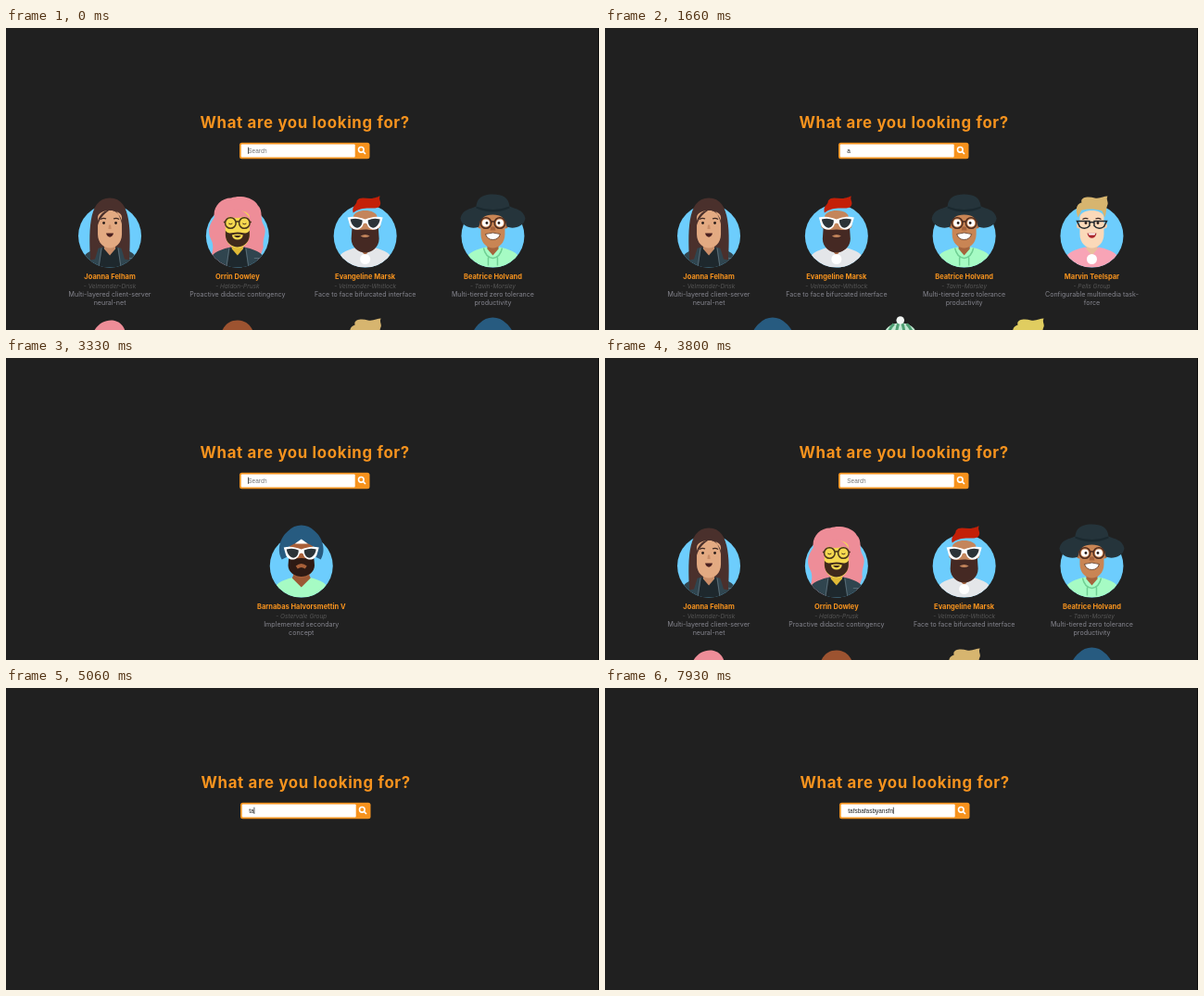
Animation of 640 by 326 pixels, one loop 8 s. Source, as an HTML page:

```html
<!DOCTYPE html>
<html lang="en">
<head>
<meta charset="utf-8">
<title>People search</title>
<style>
  html, body { margin: 0; width: 100%; height: 100%; overflow: hidden; background: #202020; }
  svg { display: block; width: 100vw; height: 100vh; }
  text { font-family: Inter, sans-serif; }
  .title { font-size: 16.8px; font-weight: 700; letter-spacing: .04em; fill: #f7931e; text-anchor: middle; }
  .field { font-family: "Liberation Sans", Arial, sans-serif; font-size: 6.45px; fill: #222; }
  .hint { fill: #757575; }
  .card text { text-anchor: middle; }
  .name { font-size: 7.5px; font-weight: 700; fill: #f7931e; }
  .firm { font-size: 6.5px; font-style: italic; fill: #565656; }
  .about { font-size: 7.1px; fill: #85858e; }
</style>
</head>
<body>
<svg viewBox="0 0 640 326" preserveAspectRatio="none">
  <defs>
    <clipPath id="bust"><path d="M-40-60H40V0H34A34 34 0 0 1-34 0H-40Z"/></clipPath>
    <path id="torso" d="M-34 36C-31 18-20 15-7 12L0 18L7 12C20 15 31 18 34 36Z"/>
    <path id="neck" d="M-6 4H6V14L0 21L-6 14Z"/>
    <path id="face" d="M-13-20C-13-30 13-30 13-20V-2C13 8 6 13 0 13S-13 8-13-2Z"/>
    <g id="ears"><circle cx="-13.5" cy="-11" r="3"/><circle cx="13.5" cy="-11" r="3"/></g>
    <g id="eyes" fill="#2a1d1a"><circle cx="-6.5" cy="-14" r="1.4"/><circle cx="6.5" cy="-14" r="1.4"/></g>
    <path id="brows" fill="none" stroke="#3f2a24" stroke-width="1.2" d="M-10-18q3-2 6-.5M4-18.5q3-1.500 6 .5"/>
    <g id="rounds" fill="none" stroke-width="1.5">
      <circle cx="-7.5" cy="-14" r="5.8"/><circle cx="7.5" cy="-14" r="5.8"/>
      <path d="M-2-15q2-1.500 4 0M-13-15h-2M13-15h2"/>
    </g>
    <g id="shades">
      <path fill="#fff" d="M-19-20C-12-22-5-20 0-18C5-20 12-22 19-20L17-13C15-5 4-5 2-13L0-14L-2-13C-4-5-15-5-17-13Z"/>
      <path id="lens" fill="#2b3338" d="M-16-18Q-9-20-3-17C-3-6-14-6-16-18Z"/>
      <use href="#lens" transform="scale(-1 1)"/>
    </g>
    <path id="beard" d="M-14-12C-11-4-6-7 0-7S11-4 14-12L15 3C15 12 7 18 0 18S-15 12-15 3Z"/>
    <path id="quiff" d="M-15-20C-19-31-15-35-11-36C-13-42-4-43 3-41C9-40 13-43 17-43C15-39 18-37 17-34C15-30 16-25 14-20L11-27C2-30-5-29-11-28Z"/>
    <g id="jacket">
      <use href="#torso" fill="#30454f"/>
      <path fill="#1e282d" d="M-8 12L-12 36H12L8 12L0 20Z"/>
      <path stroke="#6b7d87" stroke-width=".7" fill="none" d="M-9 13L-12 34M9 13L12 34M18 24h6"/>
    </g>

    <g id="a0">
      <path fill="#4a302c" d="M-21 28C-22 0-25-41 0-41S22 0 21 28Z"/>
      <use href="#jacket"/>
      <path fill="#4a302c" d="M-21-10H-12L-12 12L-16 25L-21 26ZM21-10H12L12 12L16 25L21 26Z"/>
      <use href="#neck" fill="#c98d68"/><use href="#face" fill="#e3aa82"/>
      <path fill="#4a302c" d="M-14-6C-16-35 16-35 14-6C13-18 9-26 3-31C-3-25-12-22-14-6Z"/>
      <use href="#brows"/><use href="#eyes"/>
      <path fill="#c98d68" d="M-1-12L-1.600-7.500H1.600L1-12Z"/>
      <path fill="#4a2020" d="M-4-3H4C3 2.500-3 2.500-4-3Z"/>
    </g>

    <g id="a1">
      <path fill="#ee8d98" d="M-25 34C-33 24-23 16-28 5C-34-6-29-14-25-20C-27-31-18-41-7-41C4-45 18-41 22-33C28-27 24-19 28-12C33-3 26 2 28 12L23 26Z"/>
      <use href="#jacket"/>
      <use href="#neck" fill="#dfb936"/><use href="#face" fill="#f5d84f"/>
      <path fill="#40291c" d="M-13-6C-10-1-6-4 0-4S10-1 13-6V-1C13 7 6 12 0 12S-13 7-13-1Z"/>
      <path fill="#f5d84f" d="M-6-1Q0-3 6-1Q5 4 0 4T-6-1Z"/>
      <path fill="#40291c" d="M-4-.5H4Q0 4-4-.5Z"/>
      <path fill="#ee8d98" d="M-16-6C-20-36 16-36 16-6L13-14C12-18 10-20 7-21Q-1-18-9-21C-12-19-13-14-13-11Z"/>
      <path fill="none" stroke="#40291c" d="M-9.500-13.500q2 1.500 4 0M5.500-13.500q2 1.500 4 0"/>
      <use href="#rounds" stroke="#4b371c"/>
    </g>

    <g id="a2">
      <use href="#torso" fill="#e4e6e9"/>
      <use href="#neck" fill="#a9653f"/><use href="#ears" fill="#b87950"/><use href="#face" fill="#c4855b"/>
      <path fill="#c32008" d="M-13-25C-15-33-9-33-9-38C-5-44 3-39 9-41C14-42 15-43 16-43C14-39 18-37 16-33C14-29 8-30 4-30C-2-30-8-29-13-25Z"/>
      <use href="#beard" fill="#452923"/>
      <path fill="#c4855b" d="M-5 0Q0-3 5 0Q0 3-5 0Z"/>
      <use href="#shades"/>
      <circle cy="25" r="5.5" fill="#fff"/>
    </g>

    <g id="a3">
      <use href="#torso" fill="#a6fbc4"/>
      <use href="#neck" fill="#a5633c"/><use href="#ears" fill="#b87549"/><use href="#face" fill="#c98554"/>
      <path fill="#25343b" d="M-35-19C-33-29-24-29-18-32C-17-42-10-45 0-45S17-42 18-32C24-29 33-29 35-19C34-10 22-7 15-10C13-20 9-23 0-23S-13-20-15-10C-22-7-34-10-35-19Z"/>
      <path fill="#1b292f" d="M-18-32Q0-25 18-32V-30Q0-22-18-30Z"/>
      <g fill="#fff"><circle cx="-7.5" cy="-14" r="4"/><circle cx="7.5" cy="-14" r="4"/></g>
      <use href="#eyes"/><use href="#rounds" stroke="#512e20"/>
      <path fill="#a5633c" d="M-2-10h4l1 4h-6Z"/>
      <path fill="#fff" stroke="#593420" stroke-width=".8" d="M-8-2Q0-5 8-2Q6 4 0 4T-8-2Z"/>
      <path fill="none" stroke="#70cf94" stroke-width="1.5" d="M-10 13Q-8 23 0 24Q8 23 10 13M-5 23V32M5 23V32"/>
    </g>

    <path id="a4" fill="#ee8d98" d="M-20 0C-25-29-11-42 3-41C16-39 20-28 19 0Z"/>
    <path id="a5" fill="#9d5330" d="M-18 0C-23-31-12-41 0-41S23-31 18 0Z"/>

    <g id="a6">
      <use href="#torso" fill="#f8a4b6"/>
      <use href="#neck" fill="#eabf9d"/><use href="#ears" fill="#f3cba9"/><use href="#face" fill="#fbd9b9"/>
      <use href="#quiff" fill="#d7b56f"/>
      <use href="#brows"/><use href="#eyes"/>
      <path fill="none" stroke="#22282c" stroke-width="1.5" d="M-16-16H-2.500V-11Q-7-6-13-10ZM16-16H2.500V-11Q7-6 13-10ZM-2.500-14Q0-16 2.500-14"/>
      <path fill="#a9242c" d="M-5-3H5C4 4-4 4-5-3Z"/><path fill="#fff" d="M-4-3H4L3-1H-3Z"/>
      <circle cy="25" r="5.5" fill="#fff"/>
    </g>

    <g id="a7">
      <use href="#torso" fill="#a6fbc4"/>
      <path fill="#9b5834" d="M-6 4H6L10 13L0 23L-10 13Z"/><use href="#face" fill="#a96039"/>
      <path fill="#275b80" d="M-21-7C-27-17-23-31-14-38C-7-46 7-46 14-38C23-31 27-17 21-7L15-10V-20L0-28L-15-20V-10Z"/>
      <path fill="#fff" d="M-7-24L0-29L7-24Z"/>
      <use href="#beard" fill="#2e1a14" transform="matrix(.95 0 0 .8 0 -3)"/>
      <path fill="#a96039" d="M-6 0Q0-5 6 0L4 3Q0 0-4 3Z"/>
      <use href="#shades"/>
    </g>

    <g id="a8">
      <path fill="#c3e9d3" d="M-18 0V-22C-18-33-10-38 0-38S18-33 18-22V0Z"/>
      <path fill="none" stroke="#4f9f73" stroke-width="3" d="M-14-22Q-13-31-7-37M-5-22Q-4-32-2-38M5-22Q4-32 2-38M14-22Q13-31 7-37"/>
      <circle cy="-41" r="4.3" fill="#f2f6f3"/>
    </g>
    <use id="a9" href="#quiff" fill="#e0cd60"/>
  </defs>

  <rect width="640" height="326" fill="#202020"/>
  <g id="list"></g>
  <g id="head">
    <text class="title" x="322.7" y="108.3">What are you looking for?</text>
    <rect x="252" y="123.8" width="140.5" height="17.4" rx="2.5" fill="#f7931e"/>
    <rect x="253.7" y="125.5" width="123" height="14" rx="1" fill="#fff"/>
    <g fill="none" stroke="#fff" stroke-width="1.6">
      <circle cx="383.3" cy="131.3" r="2.8"/><path d="M385.4 133.4L388 136"/>
    </g>
    <text id="field" class="field" x="261.3" y="134.7"></text>
    <rect id="caret" y="128.7" width=".7" height="7.2" fill="#111"/>
  </g>
  <rect x="639" width="1" height="326" fill="#0a0a0a"/>
</svg>
<script>
const LOOP = 8000, BLINK = 515;
const $ = id => document.getElementById(id);

// Avatars without details only ever peek over the lower edge.
const people = {
  0: ["Joanna Felham", "Velmonder-Drisk", "Multi-layered client-server", "neural-net"],
  1: ["Orrin Dowley", "Haldon-Prusk", "Proactive didactic contingency"],
  2: ["Evangeline Marsk", "Velmonder-Whitlock", "Face to face bifurcated interface"],
  3: ["Beatrice Holvand", "Tavin-Morsley", "Multi-tiered zero tolerance", "productivity"],
  6: ["Marvin Teelspar", "Pells Group", "Configurable multimedia task-", "force"],
  7: ["Barnabas Halvorsmettin V", "Ostervale Group", "Implemented secondary", "concept"]
};

const label = (cls, y, text) => `<text class="${cls}" y="${y}">${text}</text>`;

function card(id, x, y) {
  const [name, firm, ...about] = people[id] || [];
  const text = name ? label("name", 46.5, name) + label("firm", 56.2, "- " + firm) +
    about.map((line, i) => label("about", 65.8 + i * 8.6, line)).join("") : "";
  return `<g class="card" transform="translate(${x} ${y})"><circle r="34" fill="#6dcdfd"/>` +
    `<g clip-path="url(#bust)"><use href="#a${id}"/></g>${text}</g>`;
}

function grid(ids) {
  return ids.map((id, i) => {
    const row = Math.floor(i / 4), count = Math.min(4, ids.length - row * 4);
    return card(id, 318.75 + (i % 4 - (count - 1) / 2) * 137.8, 224.5 + row * 132);
  }).join("");
}

const views = [[0, 1, 2, 3, 4, 5, 6, 7], [0, 2, 3, 6, 7, 8, 9], [7], []];
$("list").innerHTML = views.map(ids => `<g>${grid(ids)}</g>`).join("");
const layers = [...$("list").children];

const mash = "tafsbafasbyansfn";
const edits = [[0, ""], [860, "a"], [1700, "as"], [3260, ""], [3930, "t"], [4020, "ta"]];
for (let n = 3; n <= mash.length; n++) edits.push([5130 + (n - 3) * 210, mash.slice(0, n)]);
const results = [[0, 0], [1000, 1], [1860, 2], [3400, 0], [4400, 3]];

const latest = (steps, t) => steps.filter(([start]) => start <= t).pop();

function draw(now) {
  const t = now % LOOP;
  const [typedAt, query] = latest(edits, t);
  const view = latest(results, t)[1];
  const field = $("field"), caret = $("caret");

  field.textContent = query || "Search";
  field.classList.toggle("hint", !query);
  caret.setAttribute("x", 261.2 + (query ? field.getComputedTextLength() : 0));
  caret.style.opacity = (t - typedAt) % (2 * BLINK) < BLINK ? 1 : 0;

  layers.forEach((layer, i) => layer.style.display = i === view ? "" : "none");
  // The page loses its scrollbar when nothing is listed.
  $("head").setAttribute("transform", `translate(${view === 3 ? 1 : 0} 0)`);
}

const start = performance.now();
function tick() {
  draw(performance.now() - start);
  requestAnimationFrame(tick);
}
tick();
</script>
</body>
</html>
```
